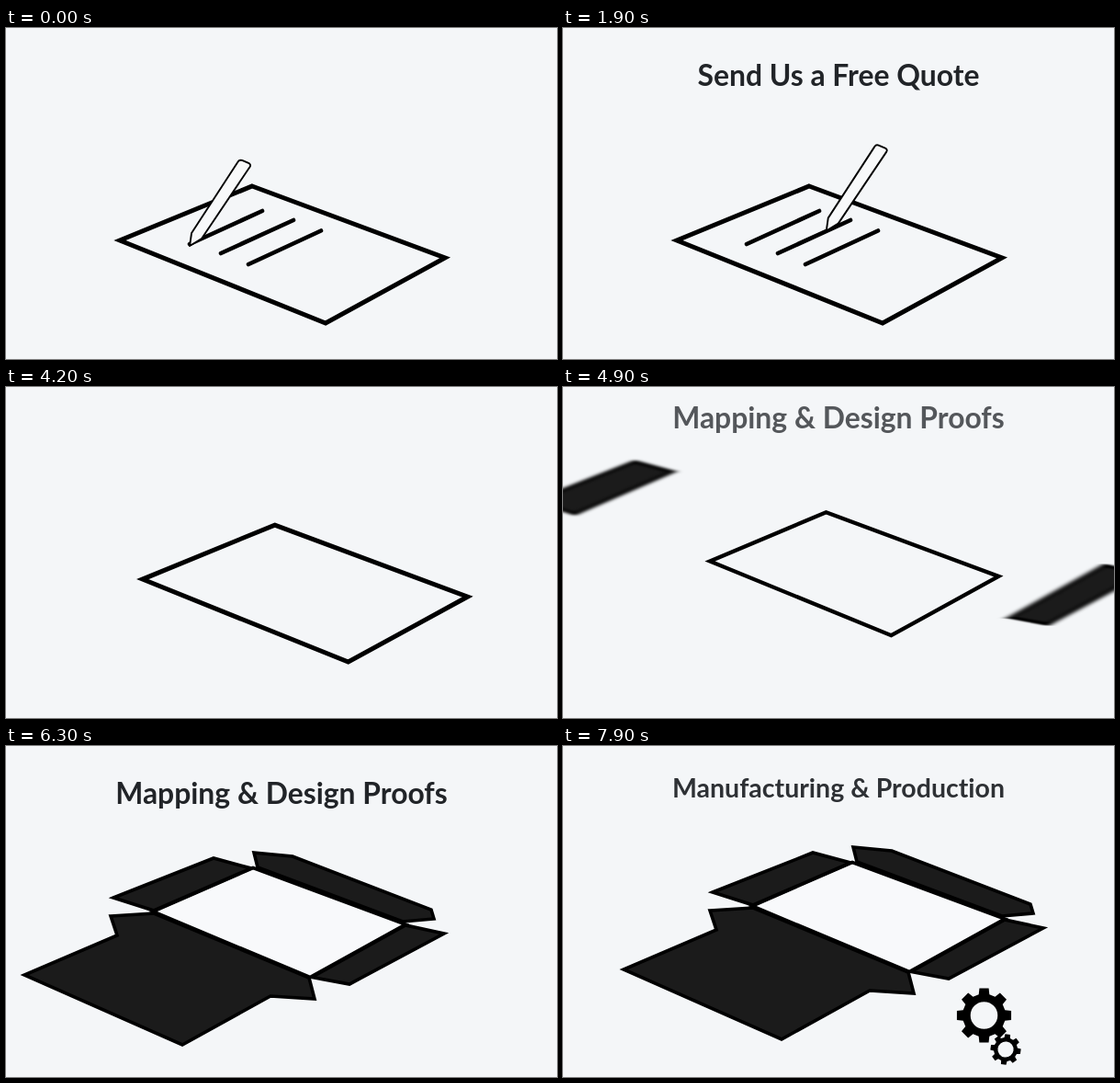
Write an HTML page that moves like this. It is 600 by 360 pixels and loops after 8000 ms.

```html
<!DOCTYPE html>
<html lang="en">
<head>
<meta charset="utf-8">
<title>Quote, design, production</title>
<style>
  html, body { margin: 0; width: 100%; height: 100%; overflow: hidden; background: #f4f6f8; }
  svg { display: block; width: 600px; height: 360px; }
  text {
    font: 700 31.85px Lato, "Open Sans", sans-serif; font-variant-ligatures: none;
    fill: #212428; text-anchor: middle;
  }
  .flap { fill: #1b1b1b; stroke: #000; stroke-width: 3.6; }
  #paper { stroke: #000; }
  #lines { stroke: #000; stroke-width: 4.6; stroke-linecap: round; }
  #pencil { fill: #f8f9fa; stroke: #000; stroke-width: 1.9; stroke-linejoin: round; }
</style>
</head>
<body>
<svg id="stage" viewBox="0 0 600 360">
  <defs id="defs"></defs>
  <g id="box">
    <polygon id="front" class="flap" points="114,185 161,182 330,252 336,275 288,272 192,325 20,249 121,206"/>
    <polygon id="back" class="flap" points="270,116 312,120 463,178 466,188 432,191 274,132"/>
    <polygon id="paper"/>
    <polygon id="left" class="flap" points="117,165 226,122 267,133 161,179"/>
    <polygon id="right" class="flap" points="333,251.500 435,195 477,204 374,259"/>
  </g>
  <g id="writing">
    <path id="lines" d="M200 235L279 199M234 245L313 209M264 257L343 220.500"/>
    <path id="pencil" d="M0 0L2 -14L52.500 -91.500Q54 -94 57 -93L64 -90Q67 -88.500 65.500 -86L13 -8Z"/>
  </g>
  <path id="bigGear" fill-rule="evenodd"/>
  <path id="smallGear" fill-rule="evenodd"/>
  <text id="quote">Send Us a Free Quote</text>
  <text id="design">Mapping &amp; Design Proofs</text>
  <text id="production" style="font-size:28.500px">Manufacturing &amp; Production</text>
</svg>
<script>
const LOOP = 8000;
const $ = id => document.getElementById(id);
const progress = (t, from, to) => Math.min(1, Math.max(0, (t - from) / (to - from)));
const smooth = p => p * p * (3 - 2 * p);
const easeIn = p => p * p;
const easeOut = p => 1 - (1 - p) ** 2;
const mix = (a, b, p) => a + (b - a) * p;

// Flaps fly in from an offset and settle at their place.
const flaps = {
  left: { dx: -297, dy: -82, from: 4500, to: 5300 },
  right: { dx: 310, dy: -2, from: 4500, to: 5300 },
  front: { dx: -360, dy: -144, from: 4900, to: 5540 },
  back: { dx: 136, dy: -424, from: 4900, to: 5540 }
};

// Captions drop in from above, then shrink while leaving sideways.
const captions = {
  quote: { y: 62.5, from: 0, to: 900, exitFrom: 3000, exitTo: 3600, distance: -493 },
  design: { y: 62.5, from: 4400, to: 5400, exitFrom: 6700, exitTo: 7200, distance: 600 },
  production: { y: 60.5, from: 7300, to: 8100, exitFrom: 9000, exitTo: 9500, distance: 0 }
};

$('defs').innerHTML = Object.keys({ ...flaps, ...captions }).map(id =>
  `<filter id="blur-${id}" filterUnits="userSpaceOnUse" x="-900" y="-600" width="2400" height="1500"
    color-interpolation-filters="sRGB"><feGaussianBlur stdDeviation="0"/></filter>`).join('');

function motionBlur(id, speeds, strength) {
  const el = $(id), speed = speeds.map(Math.abs);
  if (Math.max(...speed) > 0.12) {
    $('blur-' + id).firstElementChild.setAttribute('stdDeviation', speed.map(v => v * strength).join(' '));
    el.setAttribute('filter', `url(#blur-${id})`);
  } else {
    el.removeAttribute('filter');
  }
}

function drawFlap(id, t) {
  const { dx, dy, from, to } = flaps[id];
  const rest = time => 1 - smooth(progress(time, from, to));
  const speed = rest(t) - rest(t - 1);
  $(id).style.display = t >= from ? '' : 'none';
  $(id).setAttribute('transform', `translate(${dx * rest(t)} ${dy * rest(t)})`);
  motionBlur(id, [dx * speed, dy * speed], 7);
}

function drawCaption(id, t) {
  const { y, from, to, exitFrom, exitTo, distance } = captions[id];
  const leave = time => easeIn(progress(time, exitFrom, exitTo));
  const enter = easeOut(progress(t, from, to));
  const gone = leave(t);
  const el = $(id);
  el.style.display = t >= from && t < exitTo ? '' : 'none';
  el.setAttribute('transform',
    `translate(${300 + distance * gone} ${y - 70 * (1 - enter)}) scale(${1 - gone / 2})`);
  el.setAttribute('opacity', enter * (1 - gone * 0.25));
  motionBlur(id, [distance * (gone - leave(t - 1)), 0], 4);
}

const sheet = [[268, 172], [478, 250], [348, 321], [124, 231]];
const base = [[269, 132.5], [435, 194], [331, 251.5], [160, 180]];

function drawPaper(t) {
  const drift = smooth(progress(t, 3700, 4500));
  const shrink = smooth(progress(t, 4500, 5300));
  const points = sheet.map(([x, y], i) => [
    mix(x + 36 * drift, base[i][0], shrink),
    mix(y - 32 * drift, base[i][1], shrink)
  ]);
  const paper = $('paper');
  paper.setAttribute('points', points.join(' '));
  paper.setAttribute('stroke-width', mix(5, 3.6, shrink));
  paper.setAttribute('fill', `rgba(255,255,255,${0.35 * progress(t, 5000, 5300)})`);
}

// Pencil stops: time, x, y.
const strokes = [
  [0, 200, 237], [1000, 279, 201], [1300, 234, 246], [2200, 313, 208],
  [2400, 264, 257], [3200, 342, 218]
];

function drawWriting(t) {
  let i = 0;
  while (i < strokes.length - 2 && t >= strokes[i + 1][0]) i++;
  const [t0, x0, y0] = strokes[i], [t1, x1, y1] = strokes[i + 1];
  const p = progress(t, t0, t1);
  $('pencil').setAttribute('transform', `translate(${mix(x0, x1, p)} ${mix(y0, y1, p)})`);
  $('writing').setAttribute('opacity', 1 - progress(t, 3200, 3600));
}

function gearPath(outer, root, hole) {
  const at = (r, a) => `${r * Math.sin(a)} ${-r * Math.cos(a)}`;
  const points = [];
  for (let i = 0; i < 8; i++) {
    const a = i * Math.PI / 4;
    points.push(at(root, a - 0.25), at(outer, a - 0.17), at(outer, a + 0.17), at(root, a + 0.25));
  }
  return `M${points.join('L')}ZM${hole} 0A${hole} ${hole} 0 1 0 ${-hole} 0A${hole} ${hole} 0 1 0 ${hole} 0Z`;
}
$('bigGear').setAttribute('d', gearPath(30, 23.5, 14.8));
$('smallGear').setAttribute('d', gearPath(16.7, 13, 8.6));

function drawGears(t) {
  const visible = progress(t, 7400, 7800);
  const turn = (t - 7900) * 0.045;
  const place = (id, x, y, angle) => {
    $(id).setAttribute('transform', `translate(${x} ${y}) rotate(${angle})`);
    $(id).setAttribute('opacity', visible);
  };
  place('bigGear', 458.5, 293, turn);
  place('smallGear', 482, 330, 8 - turn * 1.8);
}

function render(t) {
  drawPaper(t);
  drawWriting(t);
  drawGears(t);
  Object.keys(flaps).forEach(id => drawFlap(id, t));
  Object.keys(captions).forEach(id => drawCaption(id, t));
  const shift = smooth(progress(t, 7250, 7900));
  $('box').setAttribute('transform', `translate(${46 * shift} ${-6 * shift})`);
}

const start = performance.now();
function tick() {
  render((performance.now() - start) % LOOP);
  requestAnimationFrame(tick);
}
tick();
</script>
</body>
</html>
```
